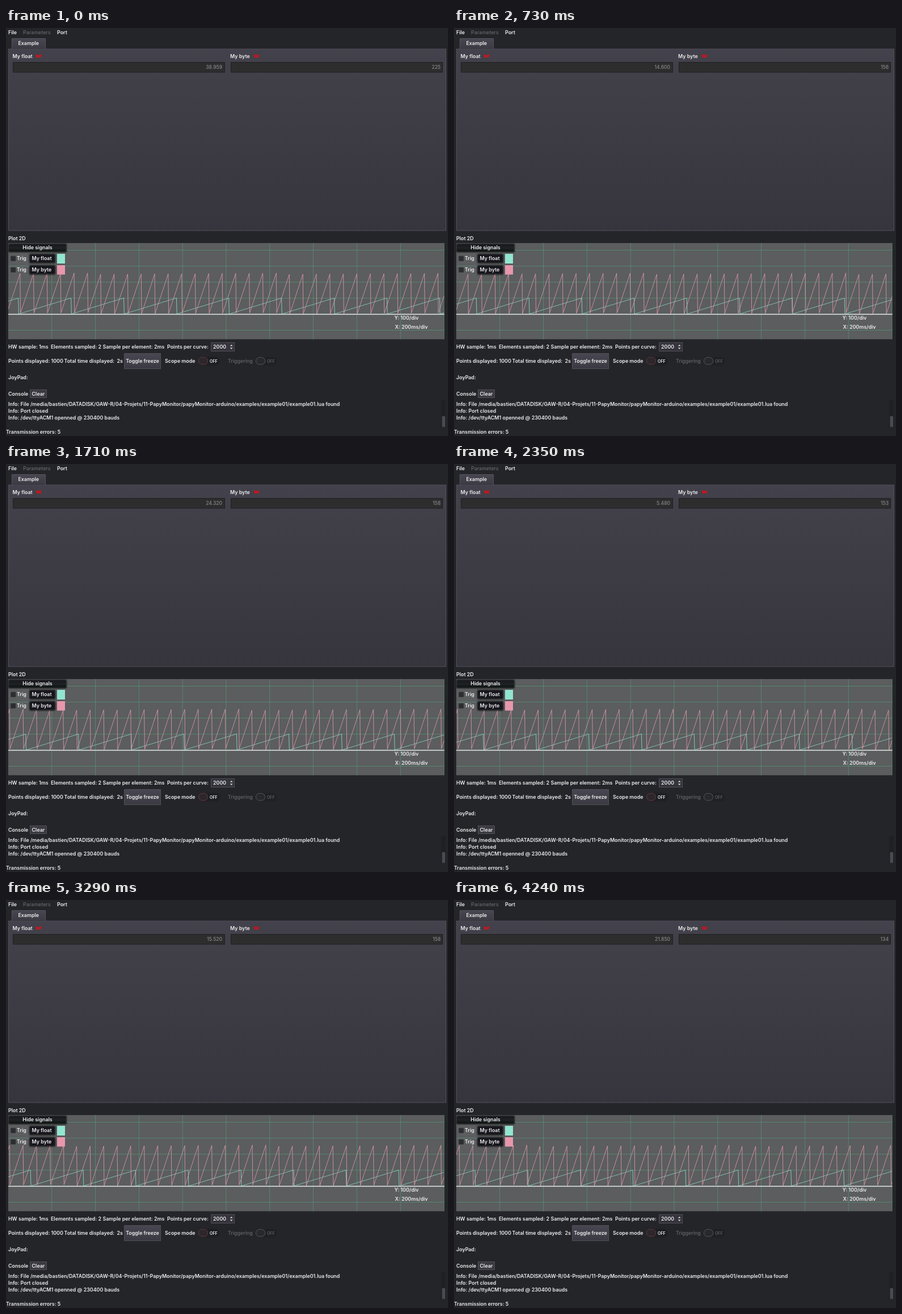
Recreate the animation shown at these times as an HTML page. Size 779 by 719 pixels, loop 4340 ms.

```html
<!DOCTYPE html>
<html lang="en">
<head>
<meta charset="utf-8">
<title>Signal monitor</title>
<style>
  html, body { margin: 0; width: 100%; height: 100%; overflow: hidden; background: #242529; }
  svg { display: block; width: 779px; height: 719px; }
  text { font: 600 8.9px Inter, "Open Sans", sans-serif; fill: #ececee; white-space: pre; }
  .dim { fill: #66666b; font-weight: 500; }
  .value { font-size: 8.5px; font-weight: 500; fill: #88888b; text-anchor: end; }
  .mid { text-anchor: middle; }
  .small { font-size: 7px; }
  .grid { stroke: #55a17c; stroke-opacity: .62; fill: none; }
  .curve { fill: none; stroke-width: .9; stroke-opacity: .88; stroke-linejoin: bevel; }
</style>
</head>
<body>
<svg id="stage" viewBox="0 0 779 719" xmlns="http://www.w3.org/2000/svg">
  <defs>
    <linearGradient id="panel" x2="0" y2="1">
      <stop stop-color="#43414b"/><stop offset="1" stop-color="#36353d"/>
    </linearGradient>
    <linearGradient id="button" x2="0" y2="1">
      <stop stop-color="#484650"/><stop offset="1" stop-color="#3b3a43"/>
    </linearGradient>
    <linearGradient id="header" x2="0" y2="1">
      <stop stop-color="#15171a"/><stop offset=".5" stop-color="#202326"/>
      <stop offset="1" stop-color="#0d0e10"/>
    </linearGradient>
    <filter id="soft" x="-10%" y="-20%" width="120%" height="140%"><feGaussianBlur stdDeviation=".9"/></filter>
    <clipPath id="plotArea"><rect x="4" y="379" width="768.5" height="169.5"/></clipPath>
  </defs>

  <rect width="779" height="719" fill="#242529"/>

  <rect x="4.5" y="37" width="771" height="320" fill="url(#panel)" stroke="#53515b"/>
  <path d="M10.5 37V18.5H69.5V37" fill="url(#button)" stroke="#55535d"/>
  <g fill="#2d2d2e" stroke="#1f1f22">
    <rect x="12.5" y="60.5" width="373" height="17.5"/>
    <rect x="396.5" y="60.5" width="373" height="17.5"/>
  </g>
  <g fill="#c5161d">
    <path id="mark" d="M53 46.2L56 47L57.7 48.2L59.4 47L62.4 46.2L61.2 52.6L57.7 51.4L54.2 52.6Z"/>
    <use href="#mark" x="383.7"/>
  </g>
  <text id="floatValue" class="value" x="381" y="72"/>
  <text id="byteValue" class="value" x="766" y="72"/>

  <g clip-path="url(#plotArea)">
    <rect x="4" y="379" width="769" height="170" fill="#5b5d5e"/>
    <path id="grid" class="grid"/>
    <path d="M4 504.5H773" stroke="#e4e8e7" stroke-width="1.5"/>
    <polyline id="floatCurve" class="curve" stroke="#93e4d0"/>
    <polyline id="byteCurve" class="curve" stroke="#e89db1"/>
    <rect x="4" y="380" width="103" height="15" rx="2" fill="url(#header)" filter="url(#soft)"/>
    <g fill="#17181b" filter="url(#soft)">
      <rect x="41" y="398" width="46" height="16.5" rx="2"/>
      <rect x="41" y="418" width="46" height="16.5" rx="2"/>
    </g>
    <g fill="#2c2d30" stroke="#3b3c3f">
      <rect x="8.5" y="402" width="8.5" height="8.5" rx="1"/>
      <rect x="8.5" y="422" width="8.5" height="8.5" rx="1"/>
    </g>
    <rect x="90" y="398" width="14" height="17" fill="#92e5d0"/>
    <rect x="90" y="418" width="14" height="16.5" fill="#e797ac"/>
  </g>

  <g stroke="#504e58" fill="url(#button)">
    <rect x="361.5" y="554.5" width="41" height="15" fill="#35343c"/>
    <rect x="208.5" y="573.5" width="64" height="27"/>
    <rect x="42.5" y="637.5" width="29" height="14" fill="#3b3a42"/>
  </g>
  <path d="M394.8 560.6L397.2 558L399.6 560.6ZM394.8 563.4L397.2 566L399.6 563.4Z" fill="#dedee0"/>
  <rect x="339" y="579.5" width="37.5" height="15" rx="7" fill="#1e1f22"/>
  <rect x="339.5" y="580.5" width="16" height="12.5" rx="6" fill="#29282c" stroke="#70343d"/>
  <rect x="440" y="579.5" width="37.5" height="15" rx="7" fill="#202124"/>
  <rect x="440.5" y="580.5" width="16" height="12.5" rx="6" fill="#28292d" stroke="#55555b"/>
  <rect x="767" y="655" width="8" height="48" rx="2" fill="#1f2023"/>
  <rect x="768.5" y="684" width="5.5" height="19" rx="1.5" fill="#4b4a53"/>
  <g id="labels"></g>
</svg>

<script>
const LOOP = 4340;
const LEFT = 4, WIDTH = 768, BASE = 504, SAMPLES = 1000;
const UNIT = 0.282;                 // pixels per signal unit
const STEP = 37.6;                  // usual scroll per refresh, in pixels
const FLOAT_PERIOD = 92.76, BYTE_PERIOD = 23.756;
const BYTE_START = 25;

// [time, number of equal refresh steps until the next entry]
const REFRESH = [
  [0, 1], [140, 6], [730, 1], [830, 4], [1200, 1], [1320, 1], [1380, 3],
  [1710, 1], [1760, 1], [1850, 5], [2350, 1], [2440, 5], [2910, 1], [3010, 3],
  [3290, 1], [3390, 1], [3490, 1], [3580, 5], [4070, 1], [4150, 1], [4240, 1]
];

// [refresh index, x of the first float drop, float reading, byte reading]
const READINGS = [
  [0, 22.3, 38.959, 225], [7, 39.7, 14.6, 156], [13, 91.8, 63.935, 90],
  [17, 35.4, 24.32, 158], [24, 52.3, 5.48, 153],
  [34, 43.4, 15.52, 158], [44, 37.5, 21.85, 134]
];

// [text, x, centre y, class]
const LABELS = [
  ["File", 4, 7.5], ["Parameters", 30, 7.5, "dim"], ["Port", 90, 7.5],
  ["Example", 39.7, 27, "mid"], ["My float", 11.5, 49.5], ["My byte", 395, 49.5],
  ["Plot 2D", 4, 370.5], ["Hide signals", 55.5, 387, "mid"],
  ["Trig", 19, 406], ["My float", 63, 406, "mid"],
  ["Trig", 19, 426], ["My byte", 63, 426, "mid"],
  ["Y: 100/div", 684.5, 511], ["X: 200ms/div", 685.5, 527],
  ["HW sample: 1ms", 4, 562], ["Elements sampled: 2", 79, 562],
  ["Sample per element: 2ms", 170.5, 562], ["Points per curve:", 284, 562],
  ["2000", 365, 562], ["Points displayed: 1000", 4, 587],
  ["Total time displayed:", 102.5, 587], ["2s", 195.5, 587],
  ["Toggle freeze", 240.5, 587, "mid"], ["Scope mode", 280, 587],
  ["OFF", 359, 587, "small"], ["Triggering", 391, 587, "dim"],
  ["OFF", 460, 587, "small dim"], ["JoyPad:", 4, 616], ["Console", 4, 644.5],
  ["Clear", 57, 645, "mid"],
  ["Info: File /media/bastien/DATADISK/GAW-R/04-Projets/11-PapyMonitor/papyMonitor-arduino/examples/example01/example01.lua found", 4, 662.3],
  ["Info: Port closed", 4, 674.5],
  ["Info: /dev/ttyACM1 openned @ 230400 bauds", 4, 686.5],
  ["Transmission errors: 5", 0, 712]
];

const byId = id => document.getElementById(id);
const mod = (n, m) => ((n % m) + m) % m;
const mix = (a, b, u) => a + (b - a) * u;

// Adds whole periods to a wrapped difference so that it lies nearest to the expected one.
const unwrap = (diff, period, expected) =>
  diff + Math.round((expected - diff) / period) * period;

function accumulate(readings) {
  const track = [{ index: 0, scroll: 0, float: readings[0][2], byte: readings[0][3] }];
  for (let i = 1; i < readings.length; i++) {
    const [i0, x0, f0, b0] = readings[i - 1], [i1, x1, f1, b1] = readings[i];
    const last = track[i - 1];
    const shift = unwrap(x0 - x1, FLOAT_PERIOD, (i1 - i0) * STEP);
    track.push({
      index: i1,
      scroll: last.scroll + shift,
      float: last.float + unwrap(f1 - f0, 100, shift * 100 / FLOAT_PERIOD),
      byte: last.byte + unwrap(b1 - b0, 256, shift * 256 / BYTE_PERIOD)
    });
  }
  return track;
}

const track = accumulate(READINGS);
const refreshTimes = REFRESH.flatMap(([start, steps], i) => {
  const end = i + 1 < REFRESH.length ? REFRESH[i + 1][0] : LOOP;
  return Array.from({ length: steps }, (_, k) =>
    Math.round(mix(start, end, k / steps) / 10) * 10);
});

function stateAt(index) {
  const i = Math.max(1, track.findIndex(p => p.index >= index));
  const a = track[i - 1], b = track[i];
  const u = (index - a.index) / (b.index - a.index);
  return {
    scroll: mix(a.scroll, b.scroll, u),
    float: mix(a.float, b.float, u),
    byte: mix(a.byte, b.byte, u)
  };
}

function sawtooth(drop, period, peak) {
  const points = [];
  for (let i = 0; i <= SAMPLES; i++) {
    const x = LEFT + i * WIDTH / SAMPLES;
    const value = mod(x - drop, period) / period * peak;
    points.push(x.toFixed(2) + "," + (BASE - value * UNIT).toFixed(2));
  }
  return points.join(" ");
}

function buildStatic() {
  let grid = "";
  for (let i = 1; i <= 10; i++) grid += `M${LEFT + i * 76.8} 379V549`;
  for (let i = -1; i <= 4; i++) grid += `M4 ${BASE + 0.3 - i * 28.2}H773`;
  byId("grid").setAttribute("d", grid);

  for (const [content, x, y, style = ""] of LABELS) {
    const node = document.createElementNS("http://www.w3.org/2000/svg", "text");
    node.setAttribute("x", x);
    node.setAttribute("y", y + (style.includes("small") ? 2.5 : 3.2));
    node.setAttribute("class", style);
    node.textContent = content;
    byId("labels").append(node);
  }
}

let shown = -1;
function render(now) {
  const t = now % LOOP;
  const index = refreshTimes.filter(start => start <= t).length - 1;
  if (index !== shown) {
    shown = index;
    const state = stateAt(index);
    byId("floatCurve").setAttribute("points",
      sawtooth(READINGS[0][1] - state.scroll, FLOAT_PERIOD, 100));
    byId("byteCurve").setAttribute("points",
      sawtooth(BYTE_START - state.scroll, BYTE_PERIOD, 256));
    byId("floatValue").textContent = mod(state.float, 100).toFixed(3);
    byId("byteValue").textContent = mod(Math.round(state.byte), 256);
  }
  requestAnimationFrame(() => render(performance.now()));
}

buildStatic();
render(0);
</script>
</body>
</html>
```
